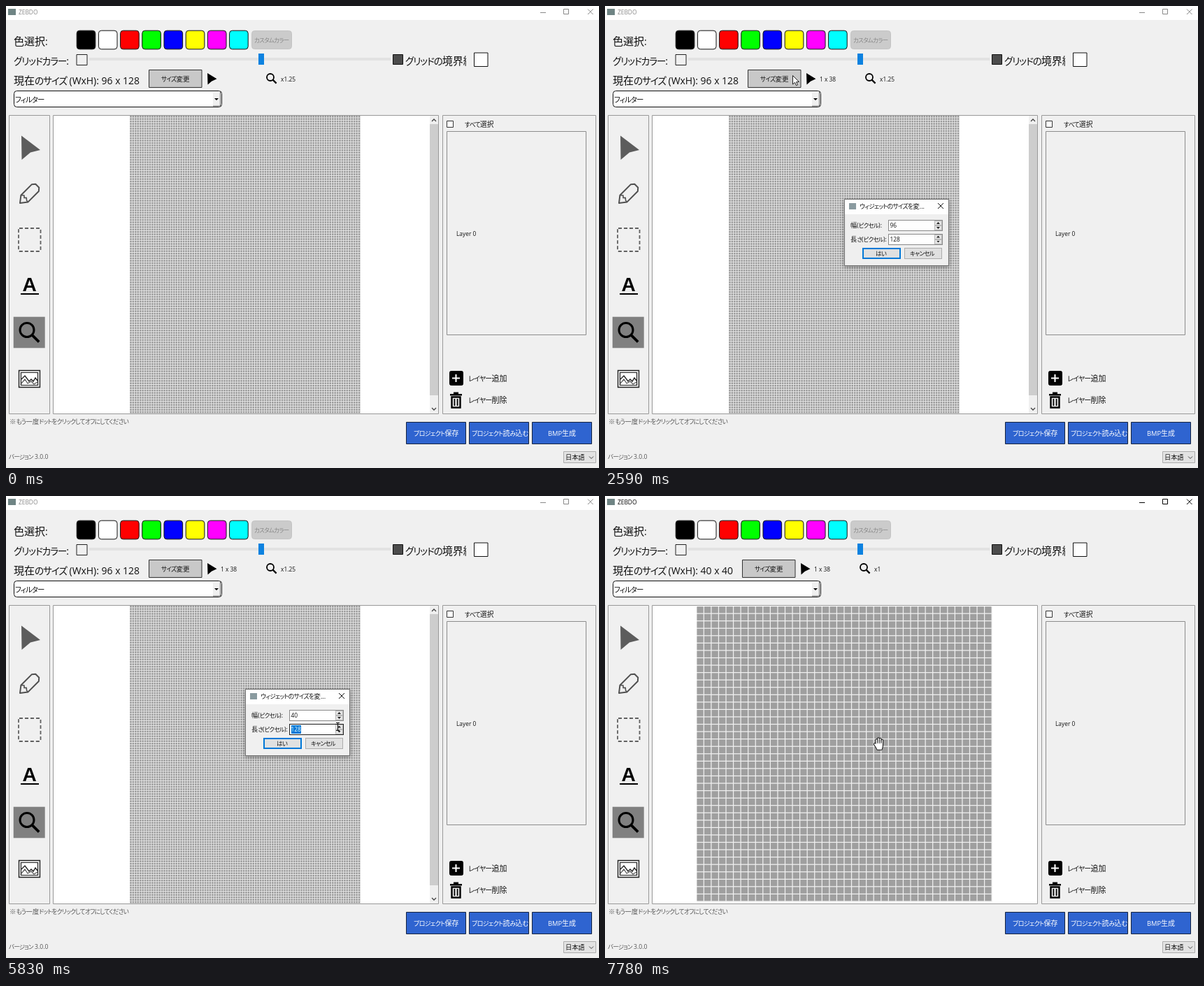
Recreate the animation shown at these times as an HTML page with a canvas. Size 848x661 px, loop 8 s.

```html
<!DOCTYPE html>
<html lang="ja">
<head>
<meta charset="utf-8">
<style>
html,body{margin:0;width:100%;height:100%;overflow:hidden;background:#f0f0f0}
#stage{position:absolute;left:0;top:0;width:848px;height:661px;overflow:hidden;
  font-family:"Open Sans","Noto Sans CJK JP",sans-serif;font-feature-settings:"palt"}
canvas,.layer,.box,.t{position:absolute;left:0;top:0}
.layer{width:848px;height:661px}
.box{box-sizing:border-box}
.t{white-space:pre;line-height:20px;height:20px;color:#111}
.k{font-size:.91em;letter-spacing:-.08em}
.l{font-size:.93em}
#dialog{transform-origin:417px 324px}
</style>
</head>
<body>
<div id="stage"><canvas id="base" width="848" height="661"></canvas></div>
<script>
const LOOP = 8000, STEP = 66;
const stage = document.getElementById('stage');
const base = document.getElementById('base').getContext('2d');

// ---------- DOM helpers ----------
function layer(id) {
  const el = document.createElement('div');
  el.className = 'layer';
  el.id = id;
  stage.append(el);
  return el;
}
function fill(el, str) {
  if (el.dataset.s === str) return;
  el.dataset.s = str;
  el.textContent = '';
  for (const run of str.match(/[ぁ-ヿ]+|[ -~]+|[^ぁ-ヿ -~]+/g) || []) {
    const s = document.createElement('span');
    s.className = /[ぁ-ヿ]/.test(run) ? 'k' : /[ -~]/.test(run) ? 'l' : '';
    s.textContent = run;
    el.append(s);
  }
}
// y is the vertical centre of the line
function text(parent, x, y, size, str, color = '#111') {
  const el = document.createElement('div');
  el.className = 't';
  el.style.cssText = `left:${x}px;top:${y - 10}px;font-size:${size}px;color:${color}`;
  fill(el, str);
  parent.append(el);
  return el;
}
function box(parent, x, y, w, h, bg, border, bw = 1) {
  const el = document.createElement('div');
  el.className = 'box';
  el.style.cssText = `left:${x}px;top:${y}px;width:${w}px;height:${h}px;background:${bg};` +
    (border ? `border:${bw}px solid ${border}` : '');
  parent.append(el);
  return el;
}

// ---------- static labels ----------
const labels = layer('labels');
const title = text(labels, 18, 9, 9, 'ZEBDO');
text(labels, 11, 50, 15, '色選択:');
text(labels, 355, 49, 9.3, 'カスタムカラー', '#888');
text(labels, 11, 78, 15, 'グリッドカラー:');
const edge = text(labels, 571, 78, 15, 'グリッドの境界線');
edge.style.width = '87px';
edge.style.overflow = 'hidden';
const sizeLabel = text(labels, 11, 105.5, 15, '');
text(labels, 13, 134, 11.5, 'フィルター');
text(labels, 656, 169.5, 9.7, 'すべて選択');
text(labels, 644, 326, 9, 'Layer 0');
text(labels, 661, 533, 11, 'レイヤー追加');
text(labels, 661, 564, 11, 'レイヤー削除');
text(labels, 5, 595, 9.5, '※もう一度ドットをクリックしてオフにしてください', '#555');
text(labels, 4, 645, 9.3, 'バージョン 3.0.0', '#555');
text(labels, 583, 611, 10, 'プロジェクト保存', '#fff');
text(labels, 666, 611, 10, 'プロジェクト読み込む', '#fff');
text(labels, 775, 611, 10, 'BMP生成', '#fff');
text(labels, 800, 646, 9.2, '日本語');

const tools = layer('tools');
text(tools, 222, 105, 9.5, 'サイズ変更');
const coords = text(tools, 307, 105, 9, '');
const zoom = text(tools, 393, 105, 9, '');

// ---------- language list ----------
const popup = layer('popup');
box(popup, 798, 480, 46, 158, '#fff', '#777');
['English', 'Deutsch', 'Français', 'Español', 'Italiano', 'Polski', '한국어', '简体中文', '繁體中文', '日本語']
  .forEach((name, i) => {
    if (i === 9) box(popup, 799, 622, 44, 15, '#0078d7');
    text(popup, 801, 488.5 + i * 15.6, 9, name, i === 9 ? '#fff' : '#111');
  });

// ---------- dialog ----------
const dialog = layer('dialog');
const frame = box(dialog, 342, 276, 150, 96, '#f0f0f0', '#6e6e6e');
frame.style.boxShadow = '0 2px 6px rgba(0,0,0,.35)';
box(dialog, 343, 277, 148, 21, '#fff');
box(dialog, 349, 282, 10, 9, '#8a9ba0');
text(dialog, 364, 287, 9.6, 'ウィジェットのサイズを変...');
const cross = document.createElement('canvas');
cross.width = cross.height = 10;
cross.style.cssText = 'left:475px;top:281px';
dialog.append(cross);
closeMark(cross.getContext('2d'), 1, 1, 8, '#111');
text(dialog, 351, 314, 9.2, '幅(ピクセル):');
text(dialog, 351, 333.5, 9.2, '長さ(ピクセル):');

function field(y) {
  const f = { rim: box(dialog, 405, y, 78, 16, '#fff', '#7a7a7a') };
  for (const [dy, mark] of [[1, 1], [8, -1]]) {
    box(dialog, 471, y + dy, 11, 7, '#e6e6e6', '#b8b8b8');
    const tri = box(dialog, 474, y + dy + 2, 5, 3, '#222');
    tri.style.clipPath = mark > 0 ? 'polygon(50% 0,100% 100%,0 100%)' : 'polygon(0 0,100% 0,50% 100%)';
  }
  f.sel = box(dialog, 407.5, y + 2, 0, 12, '#0078d7');
  f.text = text(dialog, 407.5, y + 8, 9, '');
  f.caret = box(dialog, 417, y + 2, 1, 12, '#000');
  return f;
}
const wide = field(306), tall = field(325.5);
const okBtn = box(dialog, 367.5, 346, 55, 16, '#e1e1e1', '#0078d7', 2);
box(dialog, 428, 346, 54, 16, '#e1e1e1', '#adadad');
text(dialog, 387, 354, 9.3, 'はい');
text(dialog, 436, 354, 9.3, 'キャンセル');

function setField(f, value, focus, picked, caret) {
  fill(f.text, value);
  f.rim.style.borderColor = focus ? '#222' : '#8a8a8a';
  f.sel.style.width = picked * 4.8 + 'px';
  f.text.style.color = picked ? '#fff' : '#111';
  f.caret.style.left = Math.round(407.3 + value.length * 4.85) + 'px';
  f.caret.style.visibility = caret ? 'visible' : 'hidden';
}

const top2d = document.createElement('canvas');
top2d.width = 848;
top2d.height = 661;
stage.append(top2d);
const cur = top2d.getContext('2d');

// ---------- canvas helpers ----------
function rect(x, y, w, h, color, border, lw = 1, r = 0) {
  base.beginPath();
  base.roundRect(x + .5, y + .5, w - 1, h - 1, r);
  if (color) { base.fillStyle = color; base.fill(); }
  if (border) { base.strokeStyle = border; base.lineWidth = lw; base.stroke(); }
}
function block(x, y, w, h, color) {
  base.fillStyle = color;
  base.fillRect(x, y, w, h);
}
function trace(c, pts, closed) {
  c.beginPath();
  for (let i = 0; i < pts.length; i += 2) c.lineTo(pts[i], pts[i + 1]);
  if (closed) c.closePath();
}
function poly(pts, color) {
  trace(base, pts, true);
  base.fillStyle = color;
  base.fill();
}
function line(pts, color, lw = 1) {
  trace(base, pts);
  base.strokeStyle = color;
  base.lineWidth = lw;
  base.stroke();
}
function closeMark(c, x, y, s, color) {
  c.strokeStyle = color;
  c.lineWidth = 1;
  c.beginPath();
  c.moveTo(x, y); c.lineTo(x + s, y + s);
  c.moveTo(x + s, y); c.lineTo(x, y + s);
  c.stroke();
}
function lens(x, y, r, lw, tail) {
  base.beginPath();
  base.arc(x, y, r, 0, 7);
  base.strokeStyle = '#000';
  base.lineWidth = lw;
  base.stroke();
  const d = r * .72;
  line([x + d, y + d, x + d + tail, y + d + tail], '#000', lw * 1.25);
}
function cells(x0, y0, cols, rows, pitch, size, gap, color) {
  block(x0, y0, cols * pitch, rows * pitch, gap);
  base.fillStyle = color;
  for (let r = 0; r < rows; r++)
    for (let c = 0; c < cols; c++)
      base.fillRect(x0 + c * pitch, y0 + r * pitch, size, size);
}

function drawHeader(dx, active) {
  const ink = active ? '#000' : '#888';
  block(0, 0, 848, 20, '#fff');
  block(3, 4, 11, 9, '#6f8484');
  line([764, 9.5, 772, 9.5], ink);
  rect(797, 4, 8, 8, null, ink);
  closeMark(base, 832, 4.5, 7.5, ink);

  ['#000', '#fff', '#f00', '#0f0', '#00f', '#ff0', '#f0f', '#0ff']
    .forEach((c, i) => rect(100.7 + i * 31.2, 34.7, 27.6, 27.6, c, '#111', 1, 4));
  rect(351, 35, 58, 27, '#cbcbcb', '#c4c4c4', 1, 4);

  rect(100.5, 69, 16, 16, '#f0f0f0', '#222');
  block(119, 74, 431, 4, '#e2e2e2');
  block(361, 68, 8, 16, '#0c82e0');
  rect(553, 69, 15, 15, '#4c4c4c', '#111');
  rect(669, 66.5, 20.5, 20.5, '#fff', '#111');

  rect(204 + dx, 91, 76.5, 26, '#c8c8c8', '#333');
  poly([288 + dx, 96, 301.5 + dx, 104.3, 294 + dx, 107.8, 288.5 + dx, 112.5], '#000');
  lens(378 + dx, 102, 5, 1.8, 5);

  rect(11, 121, 298, 24, '#fff', '#111', 1, 4);
  block(296, 123, 10, 19, '#f0f0f0');
  line([296, 143, 306.5, 143, 306.5, 123], '#666');
  poly([298, 132, 304, 132, 301, 135], '#000');
}

function drawTools() {
  rect(4, 156, 59, 428, '#f0f0f0', '#999');
  poly([22, 185.5, 49, 206, 35, 209.5, 22.5, 220], '#5c5c5c');

  base.save();
  base.translate(20, 282);
  base.rotate(-Math.PI / 4);
  base.lineJoin = 'round';
  trace(base, [0, 0, 9, -7, 31, -7, 35, -3.5, 35, 3.5, 31, 7, 9, 7], true);
  base.strokeStyle = '#505050';
  base.lineWidth = 2;
  base.stroke();
  line([9, -7, 12, -3.5, 9.5, -1, 12, 1, 9.5, 4, 9, 7], '#505050', 1.6);
  base.restore();

  base.setLineDash([5, 3]);
  rect(17.5, 317.5, 32.5, 34, null, '#606060', 1.8, 1);
  base.setLineDash([]);

  base.fillStyle = '#000';
  base.font = 'bold 28px "Liberation Sans",sans-serif';
  base.textAlign = 'center';
  base.fillText('A', 33.5, 407.5);
  block(21, 411, 26, 2, '#000');

  block(10.7, 444.7, 45, 44.6, '#808080');
  lens(30, 463.5, 10, 3, 10);

  rect(18, 521, 31, 25, '#f0f0f0', '#222', 1.4);
  rect(21, 524, 25, 19, '#fff', '#222', 1.2);
  line([22, 534, 27, 529, 33, 537, 36, 534, 39, 537, 42, 532, 45, 536], '#222', 1.4);
  line([22, 540, 27, 534, 31, 540, 36, 537, 40, 541, 45, 538], '#555', 1.2);
}

function drawCanvas(small) {
  rect(67, 156, 552, 428, '#fff', '#999');
  base.save();
  base.beginPath();
  base.rect(68, 157, 550, 426);
  base.clip();
  if (small) {
    cells(131.4, 158.2, 40, 40, 10.56, 9.3, '#f0f0f0', '#9f9f9f');
  } else {
    cells(177.2, 157, 96, 124, 3.4375, 2.5, '#eaeaea', '#999');
    block(606, 157, 12, 426, '#f0f0f0');
    block(606, 169, 12, 388, '#cdcdcd');
    line([609, 165, 612, 162, 615, 165], '#444', 1.3);
    line([609, 575, 612, 578, 615, 575], '#444', 1.3);
  }
  base.restore();
}

function drawSide(open) {
  rect(624, 156, 220, 428, '#f0f0f0', '#999');
  rect(630, 164, 10, 10, '#fff', '#333');
  rect(630, 179, 200, 292, '#f0f0f0', '#8c8c8c');

  rect(634, 522, 20, 21, '#000', '#000', 1, 2);
  block(638, 531.5, 11, 2, '#fff');
  block(642.5, 527, 2, 11, '#fff');

  block(635, 555, 17, 2.5, '#000');
  block(640, 552.5, 7, 3, '#000');
  rect(637, 559, 13, 16, '#f0f0f0', '#000', 2.4);
  block(640.5, 562, 1.8, 10, '#000');
  block(644.7, 562, 1.8, 10, '#000');

  for (const x of [572, 662, 752]) rect(x, 595, 86, 32, '#2f64d0', '#15233f');
  rect(797, 637, 47, 17, open ? '#cce4f7' : '#e3e3e3', open ? '#0078d7' : '#adadad');
  line([834, 644.5, 837, 647.5, 840, 644.5], '#444');
}

let drawn = '';
function drawBase(small, active, open) {
  const key = [small, active, open].join();
  if (key === drawn) return;
  drawn = key;
  block(0, 0, 848, 661, '#f0f0f0');
  drawHeader(small ? -8 : 0, active);
  drawTools();
  drawCanvas(small);
  drawSide(open);
}

// ---------- pointer ----------
const pointers = {
  arrow(c) {
    trace(c, [0, 0, 0, 12.5, 3, 9.8, 5, 14.2, 7, 13.3, 5.1, 9.2, 9, 9], true);
    c.fillStyle = '#fff';
    c.fill();
    c.strokeStyle = '#222';
    c.lineWidth = 1;
    c.stroke();
  },
  ibeam(c) {
    c.fillStyle = '#111';
    c.fillRect(0, -6, 1, 12);
    c.fillRect(-2, -6, 5, 1);
    c.fillRect(-2, 5, 5, 1);
  },
  hand(c) {
    c.lineCap = c.lineJoin = 'round';
    for (const [color, extra] of [['#111', 2], ['#fff', 0]]) {
      c.strokeStyle = c.fillStyle = color;
      c.lineWidth = 1.7 + extra;
      [-6, -8, -7.5, -5.5].forEach((y, i) => {
        trace(c, [-2.8 + i * 2.7, y + 1, -2.4 + i * 2.5, 2]);
        c.stroke();
      });
      trace(c, [-5.2, 1, -2, 6, -1, 8, 4, 8, 5, 4, 5, 0, -2.5, 0, -2.5, 3], true);
      c.fill();
      c.stroke();
    }
    c.strokeStyle = '#444';
    c.lineWidth = .7;
    for (let i = 0; i < 3; i++) {
      trace(c, [-1.3 + i * 2.6, -5, -1.1 + i * 2.5, 0]);
      c.stroke();
    }
  }
};
const route = [
  [1230, 826, 634], [1296, 700, 510], [1362, 560, 365], [1428, 455, 250], [1494, 399, 206],
  [1626, 330, 162], [1758, 285, 118], [1890, 268, 99], [2586, 268, 99], [2718, 340, 200],
  [2850, 418, 300], [2916, 428, 312], [5280, 428, 312], [5478, 409, 333], [5610, 409, 333],
  [5808, 474, 330], [5970, 474, 326], [6102, 474, 323], [7050, 474, 323], [7314, 398, 351], [7380, 391, 354]
];
function locate(t) {
  let i = 0;
  while (i < route.length - 1 && route[i + 1][0] <= t) i++;
  const a = route[i], b = route[i + 1] || a;
  const p = b === a ? 0 : (t - a[0]) / (b[0] - a[0]);
  return [a[1] + (b[1] - a[1]) * p, a[2] + (b[2] - a[2]) * p];
}

function tick(t) {
  const s = [0, 130, 600, 1230, 2190, 5280, 5970, 7050].filter(v => v <= t).pop();
  return s + Math.floor((t - s) / STEP) * STEP;
}
const ramp = (t, a, b) => Math.min(1, Math.max(0, (t - a) / (b - a)));
const pick = (t, list) => list.filter(e => e[0] <= t).pop()[1];

function render(t) {
  const q = tick(t), small = t >= 7780;
  const active = (t >= 2190 && t < 2388) || q >= 7578;
  drawBase(small, active, t >= 130 && t < 732);

  title.style.color = active ? '#000' : '#888';
  fill(sizeLabel, '現在のサイズ (WxH): ' + (small ? '40 x 40' : '96 x 128'));
  fill(coords, pick(t, [[0, ''], [1428, '27 x 84'], [1494, '17 x 70'], [1560, '7 x 52'], [1626, '1 x 38']]));
  fill(zoom, small ? 'x1' : 'x1.25');
  tools.style.transform = small ? 'translateX(-8px)' : 'none';
  popup.style.opacity = t < 130 ? 0 : ramp(q, 64, 262) - ramp(q, 534, 732);

  const shown = t >= 2388 && !small;
  dialog.style.display = shown ? 'block' : 'none';
  const [x, y] = locate(q);
  if (shown) {
    const rise = 1 - (1 - ramp(q, 2322, 2656)) ** 3;
    const fall = ramp(q, 7512, 7776);
    dialog.style.opacity = rise * (1 - fall) ** 1.3;
    dialog.style.transform = `scale(${.94 + .06 * rise - .07 * fall})`;
    const second = t >= 5560;
    const wSel = t >= 3540 && t < 4610;
    setField(wide, pick(t, [[0, '96'], [4610, '4'], [4820, '40']]), t >= 3140 && !second,
      wSel ? 2 : 0, t >= 3140 && !second && (!wSel || t >= 4350));
    const lSel = second && t < 6380 ? Math.round(3 * ramp(q, 5560, 5742)) : 0;
    setField(tall, pick(t, [[0, '128'], [6380, '4'], [6580, '40']]), second, lSel, second && !lSel);
    const over = x > 367 && x < 422 && y > 346 && y < 362;
    okBtn.style.background = over ? (t > 7446 ? '#cce4f7' : '#e5f1fb') : '#e1e1e1';
  }

  cur.clearRect(0, 0, 848, 661);
  if (t < 1230) return;
  const inField = x > 405 && x < 471 && ((y > 306 && y < 322) || (y > 325 && y < 342));
  const dragging = t >= 5560 && t < 5970;
  const onCanvas = x > 67 && x < 606 && y > 156 && y < 583;
  const kind = shown ? (inField || dragging ? 'ibeam' : 'arrow') : onCanvas ? 'hand' : 'arrow';
  cur.save();
  cur.translate(Math.round(x) + (kind === 'arrow' ? .5 : 0), Math.round(y) + (kind === 'arrow' ? .5 : 0));
  pointers[kind](cur);
  cur.restore();
}

const start = performance.now();
(function loop() {
  render((performance.now() - start) % LOOP);
  requestAnimationFrame(loop);
})();
</script>
</body>
</html>
```
